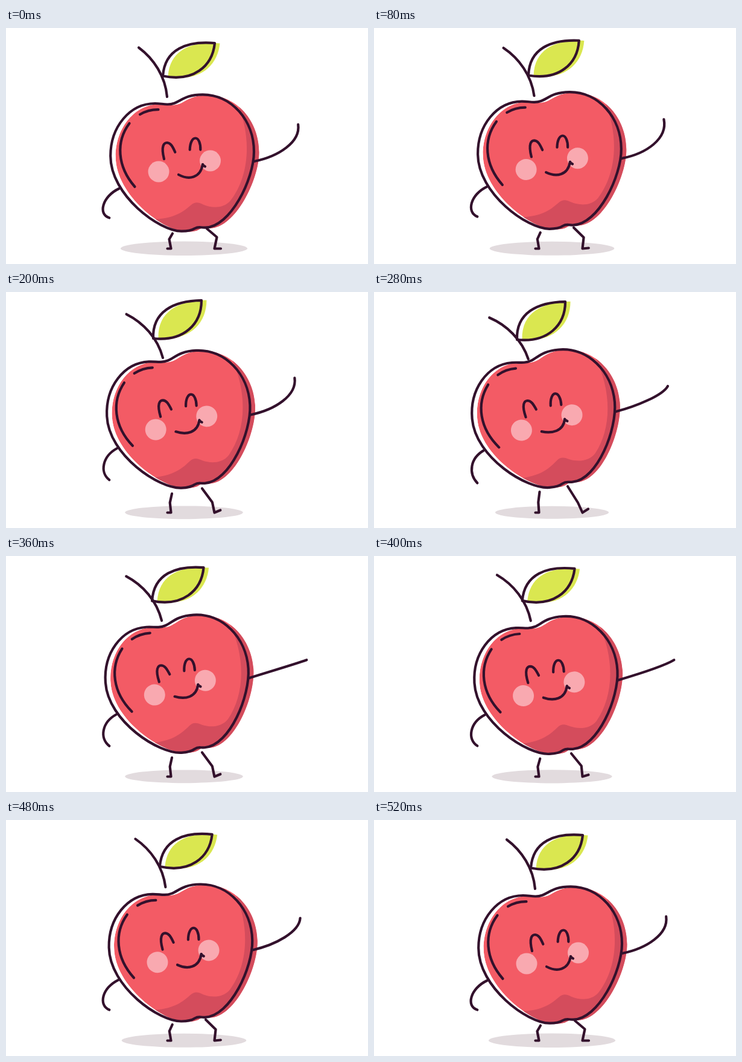
Write an HTML page with a canvas that moves like this. It is 600 px wide and 391 px high and loops after 0.56 s.

```html
<!DOCTYPE html>
<html>
<head>
<meta charset="utf-8">
<title>Dancing apple</title>
<style>
  html, body { margin: 0; height: 100%; overflow: hidden; background: #fff; }
  canvas { display: block; }
</style>
</head>
<body>
<canvas id="stage" width="600" height="391"></canvas>
<script>
const ctx = document.getElementById('stage').getContext('2d');
const INK = '#33112c', RED = '#f35b65', SHADE = '#d44c5c', BLUSH = '#f9a9b0', LEAF = '#dae750';
const LOOP = 560, STEP = 40, STEPS = 12;
const HIP = [316, 331], STEM = [267, 114], JOINT = [260, 79.5];

const body = new Path2D('M267 126.5C288 127 290 110.3 326 110.3C374 110.3 411 153 411 205C411 250 372 330 330 330.7C322 331 320 328 313 332C307 336 299 336.6 291 336.6C254 336.6 173.2 277 173.2 212C173.2 164 205 125 247 125C255 125 260 126.3 267 126.5Z');
const shade = new Path2D('M236 317C280 318 296 302 307 293C314 287 320 289 328 293C340 298 360 300 372 286C400 250 410 190 384 125L440 120V350H236Z');
const shine = new Path2D('M204.5 158C182 188 184 229 213.5 263M222 143.3Q236 135 252.5 135.2');
const eyes = new Path2D('M262 217C256.5 195 262 190 267 190C273 190.5 276 196 280.3 205.7M304.7 201.7C305 190 309 182.5 314 182.5C319 182.5 322.7 191 322.3 201.7');
const stem = new Path2D('M220 32.5C245 51 264 80 267 114');
const leaf = new Path2D('M260 79.5C263 35 300 21 346 25C342 64 310 90 260 79.5Z');

const mix = (a, b, t) => a + (b - a) * t;

function placed([px, py], dx, dy, degrees, draw) {
  ctx.save();
  ctx.translate(px + dx, py + dy);
  ctx.rotate(degrees * Math.PI / 180);
  ctx.translate(-px, -py);
  draw();
  ctx.restore();
}

function ellipse(x, y, rx, ry, color) {
  ctx.fillStyle = color;
  ctx.beginPath();
  ctx.ellipse(x, y, rx, ry, 0, 0, 7);
  ctx.fill();
}

function polyline(...points) {
  ctx.beginPath();
  points.forEach(p => ctx.lineTo(...p));
  ctx.stroke();
}

function curve(x, y, ...controls) {
  ctx.beginPath();
  ctx.moveTo(x, y);
  ctx.bezierCurveTo(...controls);
  ctx.stroke();
}

function drawBody(up) {
  ctx.save();
  ctx.translate(8.5, 1);
  ctx.clip(body);
  ctx.fillStyle = RED;
  ctx.fill(body);
  ctx.translate(-8.5, -1);
  ctx.fillStyle = SHADE;
  ctx.fill(shade);
  ctx.restore();
  ellipse(253, 238, 17.5, 17.5, BLUSH);
  ellipse(338.5, 220, 17.5, 17.5, BLUSH);
  [body, shine, eyes].forEach(path => ctx.stroke(path));
  // the smile flattens as the apple rises
  curve(286, 243, 303, 252 - 4 * up, 322, 249 - 3 * up, 326, 226);
  polyline([326, 226], [327.3, 227.8], [330, 229.5]);
}

function drawLeaf() {
  ctx.save();
  ctx.translate(8.5, 0.5);
  ctx.fillStyle = LEAF;
  ctx.fill(leaf);
  ctx.restore();
  ctx.stroke(leaf);
}

// p runs from 0 to 1 over one sway
function draw(p) {
  const up = 1 - Math.abs(2 * p - 1);
  const arc = Math.sin(Math.PI * p), lag = Math.sin(2 * Math.PI * p);
  const sway = (a, b, c) => a * up + b * arc + c * lag;

  const shift = -0.7 * up, lift = sway(0, -14.8, -0.4), tilt = sway(-5, 0, 0.7);
  const angle = tilt * Math.PI / 180, cos = Math.cos(angle), sin = Math.sin(angle);
  const onBody = (x, y) => {
    const dx = x - HIP[0], dy = y - HIP[1];
    return [HIP[0] + shift + dx * cos - dy * sin, HIP[1] + lift + dx * sin + dy * cos];
  };

  ctx.clearRect(0, 0, 600, 391);
  ctx.strokeStyle = INK;
  ctx.lineWidth = 4.2;
  ctx.lineCap = ctx.lineJoin = 'round';

  ellipse(295, 365.3, mix(105, 94, up), mix(11.7, 10.5, up), '#e2dbde');
  placed(JOINT, sway(-15, -8, 1.1), sway(17, -17.5, 1.5), sway(-9, 3.2, -3.1), drawLeaf);
  placed(STEM, sway(-9, -2.3, 1.1), sway(17, -20, 1.1), sway(-11, -2.3, -0.7), () => ctx.stroke(stem));
  placed(HIP, shift, lift, tilt, () => drawBody(up));

  // legs
  polyline([mix(276, 274.5, up), mix(340.5, 331, up)], [mix(270.5, 272.3, up), mix(350, 348.5, up)],
    [273.5, 365.5], [267.5, 365.5]);
  polyline([mix(333, 321, up), mix(332.5, 322, up)], [mix(349.5, 338, up), mix(346.5, 349, up)],
    [345.5, 365.5], [mix(356, 355, up), mix(365.5, 359.5, up)]);

  // left arm hangs, right arm straightens after the top of the sway
  const [lx, ly] = onBody(187.5, 266);
  const handY = 314.5 + sway(16, -14, -2);
  curve(lx, ly, lx - 28 + 6 * up, ly + 13, 152 + 4 * up, handY - 5.5 - 11 * up, 171.3, handY);
  const [rx, ry] = onBody(411, 221);
  const reach = Math.abs(Math.cos(Math.PI * (p - 2 / 3))) ** 3;
  curve(rx, ry, rx + mix(42, 31, reach), ry - mix(8, 9.7, reach),
    rx + mix(77, 79, reach), ry - mix(33, 24, reach),
    rx + mix(70, 95.5, reach), ry - mix(65.5, 30, reach));
}

function frame() {
  const step = Math.floor(performance.now() % LOOP / STEP);
  draw(Math.max(0, step - 1) / STEPS);
  requestAnimationFrame(frame);
}
frame();
</script>
</body>
</html>
```
